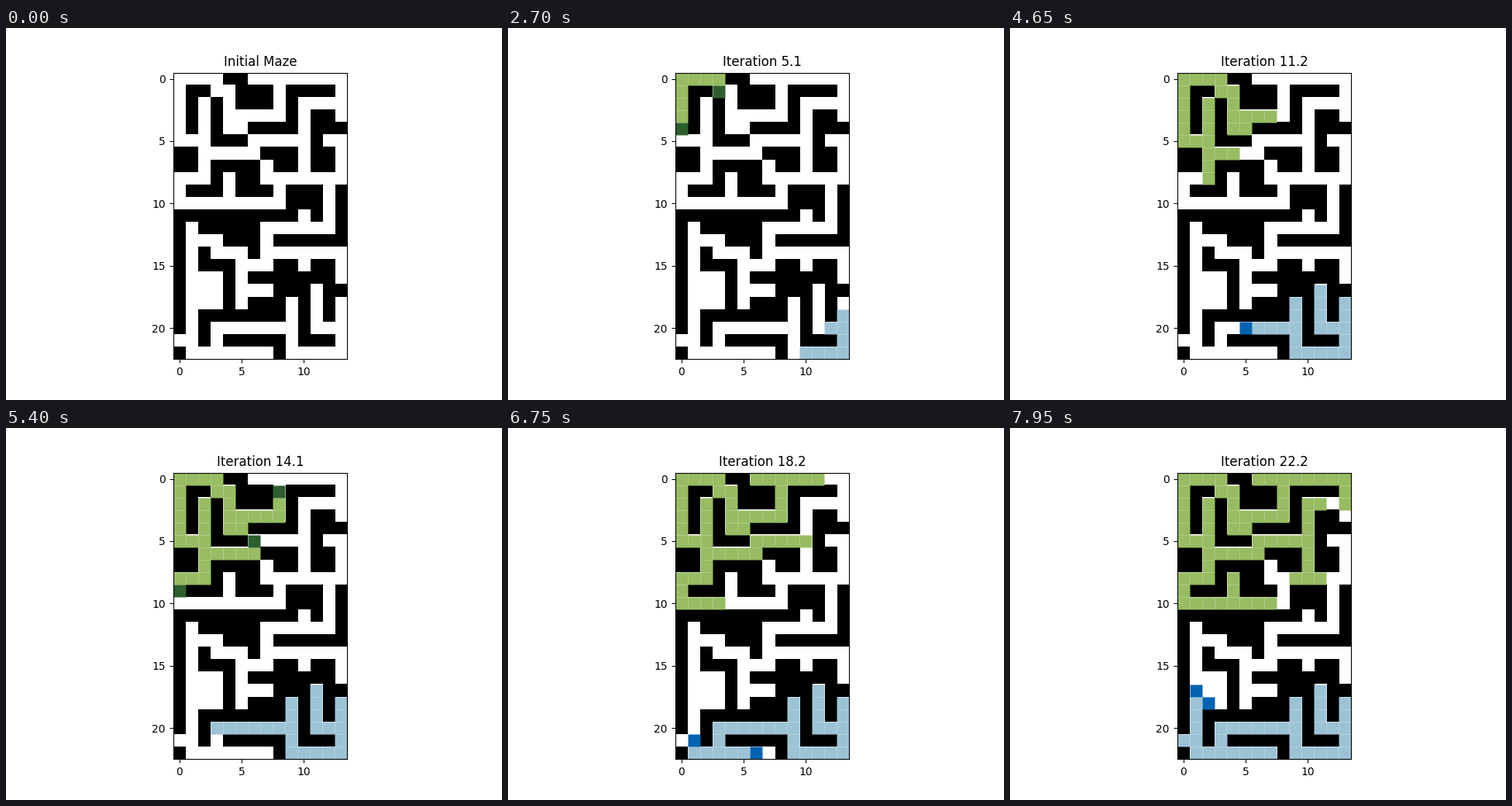
Write a matplotlib script that moves like this. It is 640 px wide and 480 px high and loops after 8 s.

```python
import matplotlib.pyplot as plt
from matplotlib.animation import FuncAnimation
from matplotlib.patches import Rectangle
import numpy as np

ROWS, COLS = 23, 14
TICK_MS = 50
LOOP_MS = 8000
INTRO_MS = 1500
STEP_MS = 150
LAST_STEP = (LOOP_MS - INTRO_MS - 1) // STEP_MS

GREEN, DARK_GREEN = "#97BC62", "#2C5F2D"
BLUE, DARK_BLUE = "#9CC3D5", "#0063B2"

# Each wall: start row and column, then the column, row, column... of each turn.
WALLS = [
    (0, 4, 5, 2, 7, 1, 6),
    (1, 2, 1, 4),
    (5, 5, 3, 2),
    (1, 12, 9, 4, 6),
    (4, 13, 12, 3, 11, 7, 12, 6),
    (6, 0, 1, 7, 0),
    (6, 7, 9, 7, 8),
    (9, 1, 3, 7, 6, 8, 5, 9, 7),
    (10, 10, 9, 9, 11, 11),
    (13, 8, 13, 9),
    (11, 9, 0, 20),
    (12, 2, 4, 13, 5, 12, 6, 14),
    (14, 2, 2, 15, 4, 19),
    (18, 6, 8, 19, 2, 21),
    (16, 6, 12, 15, 11),
    (15, 9, 8, 17, 10, 21, 12),
    (17, 13, 12, 19),
    (21, 4, 8, 22),
    (22, 0),
]


def build_maze():
    maze = np.zeros((ROWS, COLS), dtype=int)
    for row, col, *turns in WALLS:
        maze[row, col] = 1
        for i, turn in enumerate(turns):
            if i % 2 == 0:
                maze[row, min(col, turn):max(col, turn) + 1] = 1
                col = turn
            else:
                maze[min(row, turn):max(row, turn) + 1, col] = 1
                row = turn
    return maze


def distances(start):
    """Breadth-first distance of every reachable cell, nearest first."""
    found = {start: 0}
    queue = [start]
    for r, c in queue:
        for cell in ((r + 1, c), (r - 1, c), (r, c + 1), (r, c - 1)):
            inside = 0 <= cell[0] < ROWS and 0 <= cell[1] < COLS
            if inside and not maze[cell] and cell not in found:
                found[cell] = found[(r, c)] + 1
                queue.append(cell)
    return found


def add_search(start, half, visited, frontier):
    """Hidden squares for one search, with the step at which each appears."""
    squares = []
    for (r, c), dist in distances(start).items():
        step = 2 * dist + half
        if step <= LAST_STEP:
            # The almost clear edge snaps fills to half pixels, leaving soft seams.
            square = Rectangle((c - 0.5, r - 0.5), 1, 1, ec=(1, 1, 1, 0.01),
                               lw=0.72, visible=False)
            ax.add_patch(square)
            squares.append((square, step, visited, frontier))
    return squares


maze = build_maze()
fig, ax = plt.subplots(figsize=(6.4, 4.8), dpi=100)
ax.imshow(maze, cmap="binary", interpolation="nearest")
title = ax.set_title("Initial Maze")
squares = (add_search((0, 0), 0, GREEN, DARK_GREEN)
           + add_search((ROWS - 1, COLS - 1), 1, BLUE, DARK_BLUE))


def update(frame):
    step = (frame * TICK_MS - INTRO_MS) // STEP_MS
    if step < 0:
        title.set_text("Initial Maze")
    else:
        title.set_text(f"Iteration {step // 2 + 1}.{step % 2 + 1}")
    for square, shown_at, visited, frontier in squares:
        square.set_visible(step >= shown_at)
        square.set_facecolor(frontier if step == shown_at else visited)
    return [title]


anim = FuncAnimation(fig, update, frames=LOOP_MS // TICK_MS, interval=TICK_MS,
                     repeat=True, repeat_delay=0, blit=False)
plt.show()
```
